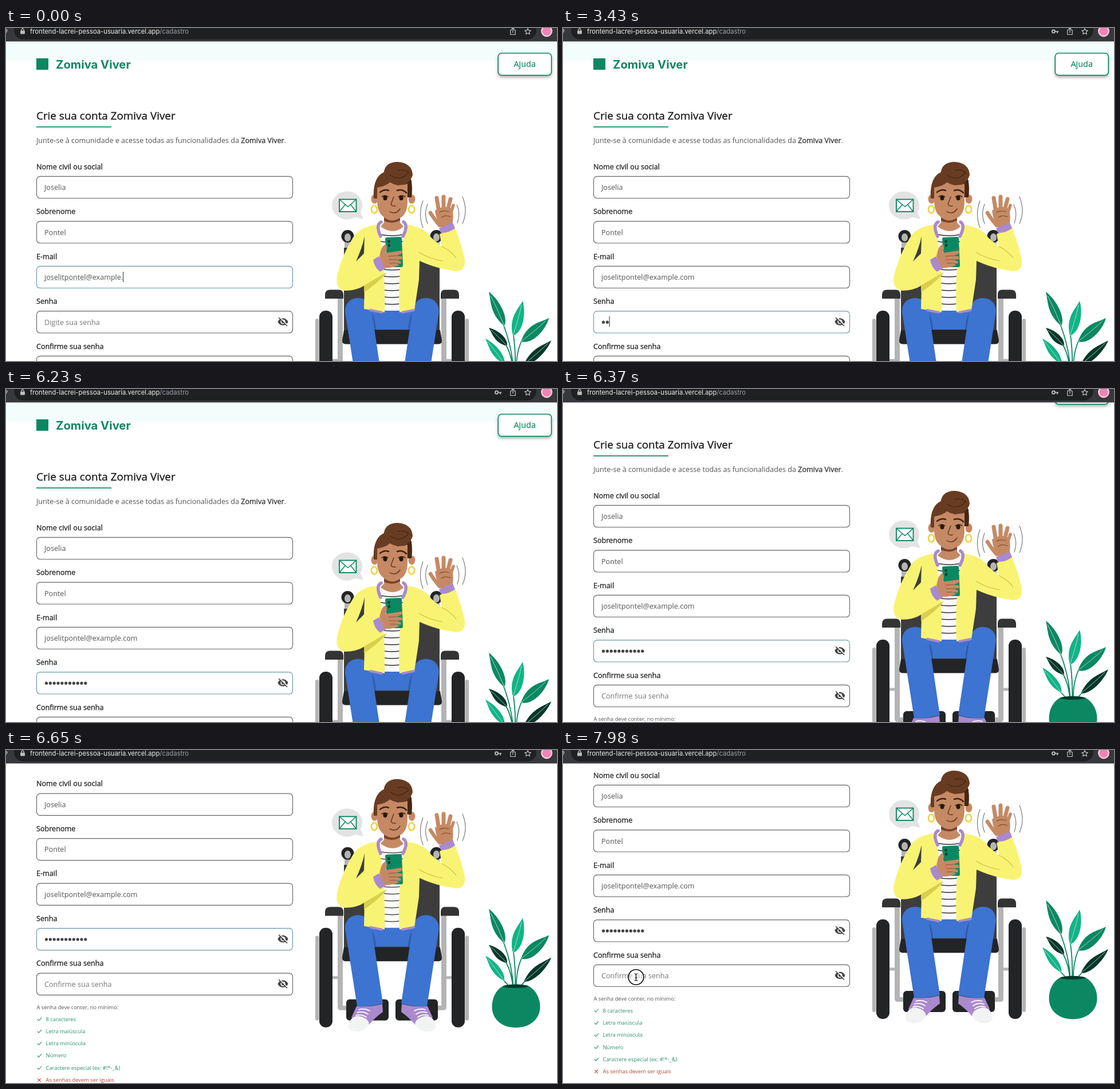
Animation, 962 px wide and 582 px high, one loop 8 s. Source, as an HTML page:

```html
<!DOCTYPE html>
<html lang="pt-BR">
<head>
<meta charset="utf-8">
<title>Cadastro</title>
<style>
html, body { margin: 0; width: 100%; height: 100%; overflow: hidden; background: #fff; }
svg { display: block; }
text { font-family: "Open Sans", "Noto Sans", sans-serif; white-space: pre; }
.label { font-size: 12.6px; fill: #222; stroke: #222; stroke-width: .3; }
.value { font-size: 12.6px; fill: #555; }
.hint { font-size: 12.6px; fill: #777; }
.small { font-size: 9.35px; }
.url { font: 11.28px Inter, Roboto, sans-serif; }
.line { fill: none; stroke-linecap: round; stroke-linejoin: round; }
</style>
</head>
<body>
<svg id="stage" width="962" height="582" viewBox="0 0 962 582"></svg>
<script>
const LOOP = 8000, STEP = 70;
const GREEN = '#0b8862', MINT = '#12b487', PINE = '#06382a';
const SKIN = '#c58a64', HAIR = '#683c22', YELLOW = '#f9f373', LILAC = '#aa89cf';
const BLUE = '#3d73d1', BLACK = '#232425', STEEL = '#b4b4b4';
const BRAND = 'Zomiva Viver';

const text = (x, y, s, attrs = '') => `<text x="${x}" y="${y}" ${attrs}>${s}</text>`;
const path = (d, fill, attrs = '') => `<path d="${d}" fill="${fill}" ${attrs}/>`;
const line = (d, color, width = 1, attrs = '') =>
  `<path class="line" d="${d}" stroke="${color}" stroke-width="${width}" ${attrs}/>`;
const rect = (x, y, w, h, fill, r = 0, attrs = '') =>
  `<rect x="${x}" y="${y}" width="${w}" height="${h}" rx="${r}" fill="${fill}" ${attrs}/>`;
const oval = (x, y, rx, ry, fill, attrs = '') =>
  `<ellipse cx="${x}" cy="${y}" rx="${rx}" ry="${ry}" fill="${fill}" ${attrs}/>`;
const mirror = (s, sum = 1348) => s + `<g transform="translate(${sum}) scale(-1 1)">${s}</g>`;

// Form
const fieldY = i => 259 + 78.5 * i;

function field(i, label, content, cls) {
  const y = fieldY(i);
  return text(53, y - 12.5, label, 'class="label"') +
    rect(53.5, y + .3, 447, 38.2, '#fff', 6, `id="box${i}" stroke="#666" stroke-width="1.15"`) +
    text(67, y + 24, content, `class="${cls}" id="input${i}"`);
}

const eye = y => `<g transform="translate(483.5 ${y})">` +
  path('M-9 0C-7.600 -3.600 -4.100 -6.200 0 -6.200S7.600 -3.600 9 0C7.600 3.600 4.100 6.200 0 6.200S-7.600 3.600 -9 0Z', '#444') +
  oval(0, 0, 4.1, 4.1, '#fff') + oval(0, 0, 2.5, 2.5, '#444') +
  line('M-5.500 -7.500L8.500 6.500', '#fff', 1.8) + line('M-7 -7L7 7', '#444', 1.6) + '</g>';

function rules() {
  const names = ['8 caracteres', 'Letra maiúscula', 'Letra minúscula', 'Número',
    'Caractere especial (ex: #!*-_&amp;)', 'As senhas devem ser iguais'];
  return text(53.5, 636, 'A senha deve conter, no mínimo:', 'class="small" fill="#555"') +
    names.map((name, i) => {
      const y = 653.5 + 21.3 * i, bad = i === 5, color = bad ? '#b2452b' : '#2c8f69';
      const mark = bad ? `M55.5 ${y - 2.5}l5 5m0 -5l-5 5` : `M55 ${y + .3}l2.3 2.2l4.5 -5`;
      return line(mark, color, 1.1) + text(69.5, y + 3.3, name, `class="small" fill="${color}"`);
    }).join('');
}

const form =
  rect(0, 23, 962, 34, '#f3fdfc') +
  rect(53, 53, 21, 20, GREEN) +
  text(87, 71, BRAND, `style="font:700 20.2px Inter,sans-serif" fill="${GREEN}"`) +
  rect(859.3, 44, 93, 38.7, '#fff', 6, `stroke="${GREEN}" stroke-width="1.7" filter="url(#shadow)"`) +
  text(886.5, 68, 'Ajuda', `font-size="14.4" fill="${GREEN}" stroke="${GREEN}" stroke-width=".2"`) +
  text(53, 160, 'Crie sua conta ' + BRAND, 'font-size="18.85" fill="#1c1c1c" stroke="#1c1c1c" stroke-width=".35"') +
  rect(53, 172, 131, 1.7, GREEN) +
  text(53, 201, 'Junte-se à comunidade e acesse todas as funcionalidades da ' +
    `<tspan fill="#333" stroke="#333" stroke-width=".3">${BRAND}</tspan>.`, 'font-size="12.6" fill="#555"') +
  field(0, 'Nome civil ou social', 'Joselia', 'value') +
  field(1, 'Sobrenome', 'Pontel', 'value') +
  field(2, 'E-mail', '', 'value') +
  field(3, 'Senha', 'Digite sua senha', 'hint') +
  field(4, 'Confirme sua senha', 'Confirme sua senha', 'hint') +
  eye(513.5) + eye(592) + rules() +
  '<path id="spell" stroke="#888" stroke-width="1.2" stroke-dasharray="1.2 1.6"/>' +
  '<g id="dots" fill="#444"></g>' + rect(0, 0, 1, 18, '#222', 0, 'id="caret"');

// Illustration
const chairBack =
  mirror(rect(591, 360, 11, 50, STEEL, 5) + oval(596.5, 364, 11, 11, BLACK) + oval(596.5, 366, 5.5, 7, STEEL)) +
  path('M590 384H757V532H590Z', '#3d3d3d');

const chairFront = mirror(
  rect(540, 508, 6.5, 148, STEEL, 3) + rect(569, 578.5, 12, 5, STEEL) +
  path('M579 470H588V630H604V638H584Q579 638 579 632Z', STEEL) +
  rect(547, 494, 23, 174, BLACK, 11) +
  path('M557 473V466Q557 457.500 566 457.500H581Q589 457.500 589 466V473Z', '#333') +
  rect(594, 619, 74, 37, BLACK, 6)) +
  path('M590 528H758L761 546Q761 552.500 755 552.500H593Q587 552.500 587 546Z', BLACK);

const legs =
  path('M630 488H718V527H630Z', BLUE) +
  mirror(
    path('M634 489Q645 505 646 527H638Z', '#2e5cab') +
    path('M592 496C592 480 602 472 615 472C629 472 637 482 639 498L658 626Q636 633 613 631Z', BLUE) +
    path('M612 631Q636 633 657 627L658 641Q644 651 634 663L603 651Z', LILAC) +
    path('M598 667Q600 648 616 648Q631 651 634 661Q629 675 613 675.500Q599 675 598 667Z', '#f2f3f3') +
    line('M616 637Q626 634 635 639M613 642Q624 639 632 645M611 647Q620 644 629 650', '#fff', 1.8));

const stripes = Array.from({length: 11}, (_, i) => {
  const y = 361 + 12 * i;
  return line(`M654 ${y}Q674 ${y + 4} 694 ${y}`, '#333', 1.3);
}).join('');

const torso =
  path('M650 345H698L692 494H656Z', '#fafafa') + stripes +
  path('M660 322H688V340L694 347Q676 363 654 347L660 340Z', SKIN) +
  path('M660 331Q675 342 688 331V336Q674 344 660 337Z', '#74432b') +
  path('M650 343C632 346 616 350 606 366Q587 396 578 432Q574 457 592 459Q612 459 626 450L625 491L661 497Q663 420 650 343Z', YELLOW) +
  path('M698 343C718 347 734 352 742 366L761 382L757 360L784 349Q796 380 801 405Q803 425 786 425Q752 421 722 407L721 440L713 493L687 497Q683 420 698 343Z', YELLOW) +
  path('M626 364L625 394L611 408Q622 384 626 364Z', '#3d3d3d') +
  path('M625 450L664 427L663 430Q645 449 625 462Z', '#d9cf4e') +
  path('M607 415L643 401L661 424Q629 449 602 458Z', YELLOW) +
  line('M721 392Q739 403 762 407M761 382Q776 389 786 402', '#c9bf45', 1.1) +
  line('M655 339Q645 344 654 364M694 339Q703 345 693 364', LILAC, 5.5) +
  line('M636 493L656 497M712 493L692 497', LILAC, 4);

const phoneHand =
  path('M641 405L651 399L663 420L653 426Q643 418 641 405Z', LILAC) +
  path('M665 366L688 365Q691 365 691 368L693 415Q693 418 690 418H669Q666 418 666 415L662 369Q662 366 665 366Z', GREEN) +
  oval(668.5, 373, 2.3, 2.5, '#12382d') + oval(669, 380, 2.3, 2.5, '#12382d') +
  path('M652 400Q655 380 663 378Q667 382 663 393L691 389Q693 392 690 395L681 398L691 399L692 404L682 405L690 408L689 412L680 411L687 414Q676 420 661 419Z', SKIN) +
  line('M668 399L681 398M669 405L682 405M670 411L680 411', '#8c5538', 1);

const finger = (d, width) => line(d, SKIN, width);
const wavingHand =
  path('M749 319Q764 308 779 316Q783 333 778 347L761 352Q751 337 749 319Z', SKIN) +
  finger('M757 345Q747 333 741 323', 6.5) + finger('M756 322L752 297', 7) +
  finger('M764 318L764 295', 7) + finger('M771 319L776 299', 7) + finger('M776 325L781 310', 5.5) +
  line('M757 322Q765 318 773 321M760 331Q767 326 776 330', '#79482f', 1.1) +
  path('M756 350L780 340L784 350Q772 359 759 358Z', LILAC) +
  line('M736 308Q729 325 736 342M728 302Q719 325 728 349M787 309Q794 324 788 341M797 295Q807 319 797 342', '#858585', 1.3);

const head =
  oval(643.5, 299, 6, 8, SKIN) + oval(708.5, 299, 6, 8, SKIN) +
  path('M642 298Q640 265 656 254Q684 238 706 261Q711 276 708 296L698 290L650 280L648 298Z', HAIR) +
  path('M699 266H708L708 296H701Z', '#472714') +
  path('M648 279Q665 276 672 268Q690 278 701 272V303Q701 334 676 335Q648 334 648 302Z', SKIN) +
  path('M659 257Q660 234 684 234Q709 236 710 257Q705 274 684 275Q666 271 659 257Z', HAIR) +
  line('M671 257Q688 269 703 253Q696 246 684 249', '#472714', 1.4) +
  line('M653 287Q661 281 668 284M683 284Q692 281 699 288', '#3b2115', 2.5) +
  oval(662, 297, 3.6, 4.2, '#26190f') + oval(690, 297, 3.6, 4.2, '#26190f') +
  line('M656 295Q661 291 667 295M685 295Q691 291 697 295', '#26190f', 1.3) +
  line('M677 295L672 308Q674 312 680 311M670 321Q681 327 688 316', '#5d321e', 1.4) +
  mirror(oval(643, 317, 5, 6.5, 'none', 'stroke="#f0d33b" stroke-width="2.6"'), 1351);

const mail =
  oval(595.5, 310, 26.5, 24.5, '#e3e3e3') + path('M607 330L624 334L617 318Z', '#e3e3e3') +
  rect(582, 299.5, 29.5, 21.5, '#fff', 0, `stroke="${GREEN}" stroke-width="1.9"`) +
  line('M582 299.500L597 312.500L611.500 299.500M582 321L592 309M611.500 321L602 309', GREEN, 1.5);

// Leaf from tip to base, fuller on one side, with a pale vein
function leaf(x1, y1, x2, y2, width, color) {
  const dx = x2 - x1, dy = y2 - y1, n = width / Math.hypot(dx, dy);
  const at = (k, s) => `${x1 + dx * k - dy * n * s} ${y1 + dy * k + dx * n * s}`;
  return path(`M${x1} ${y1}C${at(.3, .35)} ${at(.55, 1.2)} ${x2} ${y2}C${at(.8, -1.3)} ${at(.25, -.8)} ${x1} ${y1}Z`, color) +
    line(`M${at(.12, 0)}Q${at(.5, -.12)} ${x2} ${y2}`, '#c9eadd', .8);
}

const plant =
  line('M869 520Q884 560 886 600M886 537Q890 565 889 600M900 547Q890 570 891 600M873 554Q884 575 885 600M906 587L893 602M869 586L884 602', GREEN, 1.8) +
  leaf(843, 461, 870, 521, 11.5, GREEN) + leaf(902, 477, 885, 538, 13, MINT) +
  leaf(948, 507, 899, 548, 14, GREEN) + leaf(843, 524, 875, 556, 9.5, PINE) +
  leaf(952, 546, 904, 588, 10.5, PINE) + leaf(837, 543, 870, 587, 9.5, MINT) +
  path('M867 596Q890 589 913 596C925 603 932.500 617 932.500 632C932.500 654 914 668.500 890 668.500C866 668.500 848.500 654 848.500 632C848.500 617 855 603 867 596Z', GREEN) +
  oval(890, 596, 22, 3, PINE);

const art = chairBack + chairFront + legs + torso + phoneHand + wavingHand + head + mail + plant;

// Browser bar
const bar =
  rect(0, 0, 962, 23.5, '#37383b') + rect(14, -16, 912, 36, '#1f2022', 16) +
  line('M0 2L2 4L0 8', '#ccc', 1.2) +
  rect(25, 4.5, 8, 6, '#bbb', 1) + line('M26.800 5V3Q29 -1 31.200 3V5', '#bbb', 1.3) +
  text(42, 10, 'frontend-lacrei-pessoa-usuaria.vercel.app<tspan fill="#9aa0a6">/cadastro</tspan>', 'class="url" fill="#eee"') +
  '<g id="key">' + oval(856.5, 6, 2.6, 2.6, 'none', 'stroke="#c4c5c7" stroke-width="1.7"') +
  line('M859.500 6H864.500M863 6V8.500', '#c4c5c7', 1.7) + '</g>' +
  line('M883 3.500H880.800V11.500H889.200V3.500H887M885 8V0M882.800 2L885 -.3L887.200 2', '#c4c5c7', 1.2) +
  line('M911 .8L912.600 4.200L916.300 4.600L913.500 7.100L914.300 10.800L911 8.900L907.700 10.800L908.500 7.100L905.700 4.600L909.400 4.200Z', '#c4c5c7', 1.2) +
  oval(944, 5.5, 8.8, 8.8, '#f283b6', 'stroke="#f8d5e4" stroke-width="2.2"');

const pointer = '<g id="pointer">' + oval(0, 0, 13.3, 13.3, '#fff', 'fill-opacity=".45" stroke="#111" stroke-width="1.6"') +
  line('M-2.500 -6Q0 -6 0 -4Q0 -6 2.500 -6M0 -4V4M-2.500 6Q0 6 0 4Q0 6 2.500 6M-1.500 1H1.500', '#111', 1.1) + '</g>';

const $ = id => document.getElementById(id);
$('stage').innerHTML =
  '<defs><filter id="shadow" x="-20%" y="-30%" width="140%" height="180%">' +
  '<feDropShadow dx="0" dy="3" stdDeviation="2.5" flood-color="#000" flood-opacity=".3"/></filter></defs>' +
  `<g id="page">${form}${art}</g>${bar}${pointer}`;

// Timeline
const LOCAL = 'joselitpontel', EMAIL = LOCAL + '@example.com';
const emailKeys = [140, 350, 490];
const dotKeys = [2940, 3430, 3640, 3780, 3920, 4060, 4130, 5040, 5320, 5530, 5740];
const caretOff = [[1050, 1540], [2450, 2940], [4620, 5040], [6230, LOOP]];
const scrollKeys = [[6230, 0], [6300, 16], [6370, 56], [6440, 103], [6510, 141.4], [6580, 167],
  [6650, 183.2], [6720, 190.5], [6790, 194.5], [6860, 196.5], [6930, 197.3], [7070, 198]];
const showPath = [[1050, 150, 441], [1400, 92, 491], [1610, 69, 509], [1820, 71, 509.5]];
const clickPath = [[6790, 59, 510], [7490, 61, 507], [7700, 92, 455], [7910, 124, 402], [7980, 127.5, 397]];

const count = (keys, t) => keys.filter(k => k <= t).length;

function track(keys, t) {
  if (t <= keys[0][0]) return keys[0].slice(1);
  for (let i = 1; i < keys.length; i++) {
    const [a, ...from] = keys[i - 1], [b, ...to] = keys[i];
    if (t <= b) return from.map((v, j) => v + (to[j] - v) * (t - a) / (b - a));
  }
  return keys[keys.length - 1].slice(1);
}

const show = (id, on) => $(id).setAttribute('display', on ? 'inline' : 'none');

function render(now) {
  const t = Math.floor(now % LOOP / STEP) * STEP;
  const focus = t < 1960 ? 2 : t < 6860 ? 3 : -1;
  const typed = count(dotKeys, t);

  $('page').setAttribute('transform', `translate(0 ${-track(scrollKeys, t)[0]})`);
  for (const i of [2, 3]) $('box' + i).setAttribute('stroke', i === focus ? '#6a97a5' : '#666');

  const email = $('input2');
  email.textContent = EMAIL.slice(0, EMAIL.length - 3 + count(emailKeys, t));
  $('spell').setAttribute('d', `M67 441H${67 + email.getSubStringLength(0, LOCAL.length)}`);
  show('spell', t < 1050);

  show('input3', !typed);
  $('dots').innerHTML = Array.from({length: typed}, (_, i) => oval(70.5 + 6.83 * i, 514.2, 2.6, 2.6, '#444')).join('');

  const caretX = focus === 2 ? 67 + email.getComputedTextLength() : 67 + 6.83 * typed;
  $('caret').setAttribute('x', caretX);
  $('caret').setAttribute('y', focus === 2 ? 426 : 504);
  show('caret', focus > 0 && !caretOff.some(([a, b]) => t >= a && t < b));

  show('key', t >= 3010);
  const [x, y] = track(t < 4000 ? showPath : clickPath, t);
  $('pointer').setAttribute('transform', `translate(${x} ${y})`);
  show('pointer', t >= 1050 && t < 1960 || t >= 6790);
}

const start = performance.now();
function tick() {
  render(performance.now() - start);
  requestAnimationFrame(tick);
}
tick();
</script>
</body>
</html>
```
